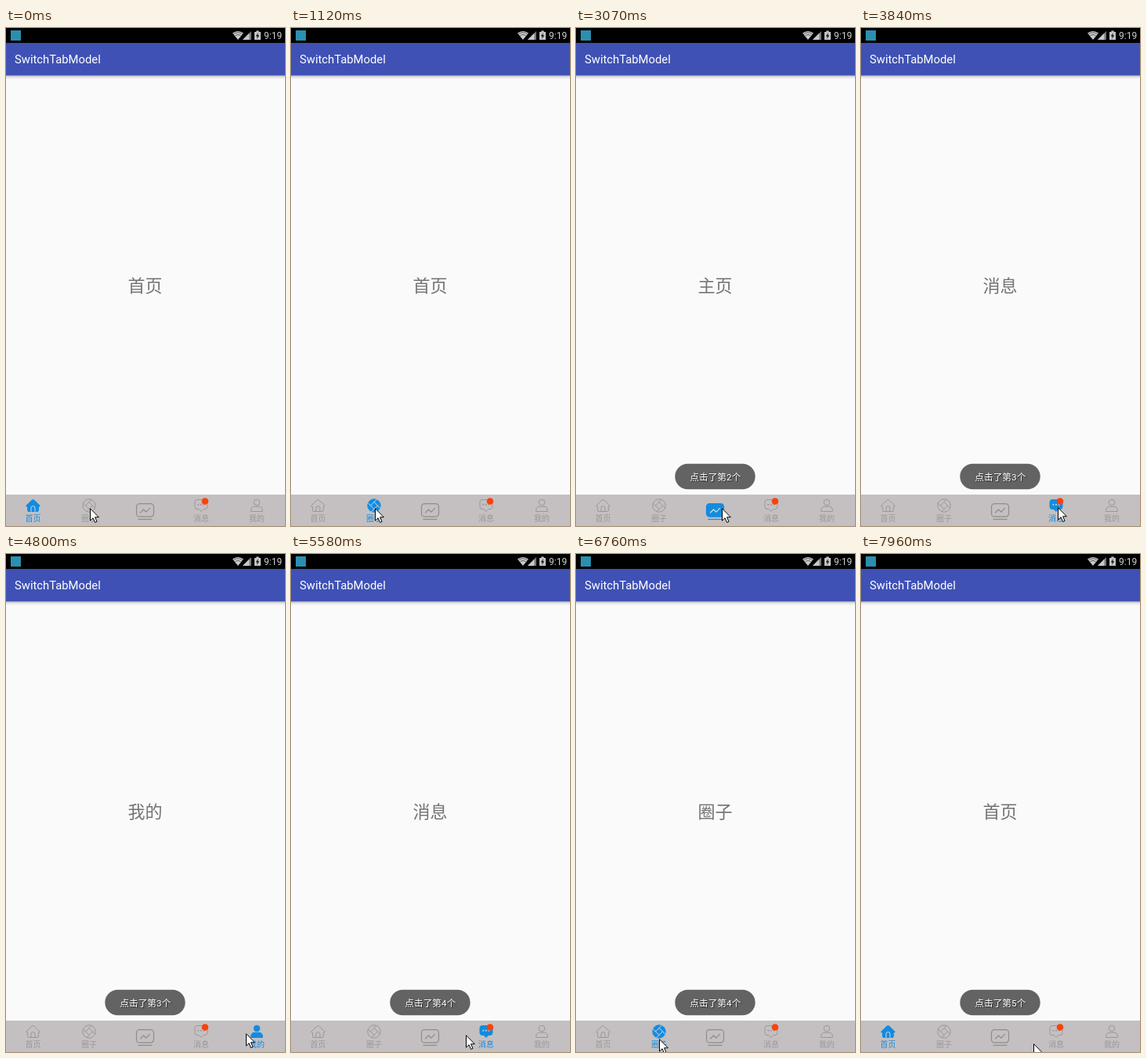
These frames come from a looping animation (356x634 px, 8 s). An HTML page:

```html
<!DOCTYPE html>
<html lang="zh-CN">
<head>
<meta charset="utf-8">
<title>Tab bar</title>
<style>
  html, body { margin: 0; width: 100%; height: 100%; overflow: hidden; background: #fafafa; }
  svg { display: block; width: 356px; height: 634px; }
  text { font-family: Roboto, "Noto Sans CJK SC", "Noto Sans CJK JP", sans-serif; }
  .page { font-size: 22px; fill: #737373; text-anchor: middle; }
  .tab { --line: #9b9799; --fill: none; --detail: #9b9799; }
  .tab.mid { --line: #8f8c8e; --detail: #8f8c8e; }
  .tab.on { --line: #148be0; --fill: #148be0; --detail: #d3dbe2; }
  .tab text { font-size: 10px; fill: var(--line); text-anchor: middle; }
  .shape { fill: var(--fill); stroke: var(--line); stroke-linejoin: round; }
  .detail { fill: none; stroke: var(--detail); stroke-linecap: round; stroke-linejoin: round; }
  .dot { fill: var(--detail); }
  .toast text { font-size: 11.7px; fill: #fff; text-shadow: 1px 1px 1px #0009; }
</style>
</head>
<body>
<svg viewBox="0 0 356 634">
  <defs>
    <linearGradient id="shade" x2="0" y2="1">
      <stop stop-color="#000" stop-opacity=".26"/>
      <stop offset=".4" stop-color="#000" stop-opacity=".1"/>
      <stop offset="1" stop-color="#000" stop-opacity="0"/>
    </linearGradient>
  </defs>
  <rect width="356" height="634" fill="#fafafa"/>

  <!-- status bar -->
  <rect width="356" height="19" fill="#000"/>
  <rect x="6" y="3" width="13" height="13" fill="#2b8fb0"/>
  <path d="M289 6.6Q296 1.4 303 6.6L296 15Z" fill="#c9c9c9"/>
  <path d="M290.5 7.6Q296 3.8 301.5 7.6M292.4 9.6Q296 7 299.6 9.6" fill="none" stroke="#000" stroke-width=".5"/>
  <path d="M302 15L313 4V15Z" fill="#777"/>
  <path d="M302 15L310.5 6.5V15Z" fill="#c9c9c9"/>
  <path d="M317 5H319.3V3.5H322.7V5H325V15H317Z" fill="#c4c4c4"/>
  <path d="M322 6L318.7 10.6H320.8L320 14L323.3 9.3H321.2Z" fill="#111"/>
  <text x="329" y="14" font-size="12" fill="#d0d0d0">9:19</text>

  <!-- app bar -->
  <rect y="60.5" width="356" height="5" fill="url(#shade)"/>
  <rect y="19" width="356" height="41.5" fill="#3f51b5"/>
  <text x="11" y="45.2" font-size="14.8" fill="#fff">SwitchTabModel</text>

  <text class="page" id="page" x="177.5" y="336"></text>

  <!-- bottom bar -->
  <rect y="594" width="356" height="40" fill="#c4c0c1"/>
  <g class="tab" transform="translate(34.5 608)">
    <path class="shape" d="M-8.8 .2L-1.4-6.9Q0-8 1.4-6.9L8.8 .2Q9 1.2 6.9 1.2V6Q6.9 7.5 5.4 7.5H-5.4Q-6.9 7.5-6.9 6V1.2Q-9 1.2-8.8 .2Z"/>
    <path class="detail" d="M-2.5 7.3V3Q-2.5 .6 0 .6T2.5 3V7.3"/>
    <text y="20">首页</text>
  </g>
  <g class="tab" transform="translate(106 608)">
    <circle class="shape" r="8.2"/>
    <path class="detail" id="wheel"/>
    <text y="20">圈子</text>
  </g>
  <g class="tab mid" transform="translate(177.5 615)" stroke-width="1.2">
    <rect class="shape" x="-11" y="-9.4" width="22" height="16.6" rx="4"/>
    <path class="detail" d="M-6 2L-2-2L1.5 1.2L6-3.6"/>
    <path class="shape" d="M-9 10.5H9"/>
  </g>
  <g class="tab" transform="translate(249 608)">
    <path class="shape" d="M-5-7.5H5Q8-7.5 8-4.5V1.5Q8 4.5 5 4.5H3L0 7.5L-3 4.5H-5Q-8 4.5-8 1.5V-4.5Q-8-7.5-5-7.5Z"/>
    <circle class="dot" cx="-3.6" cy="-1.3" r="1"/>
    <circle class="dot" cy="-1.3" r="1"/>
    <circle class="dot" cx="3.6" cy="-1.3" r="1"/>
    <circle cx="5" cy="-5.5" r="4.3" fill="#f9420c"/>
    <text y="20">消息</text>
  </g>
  <g class="tab" transform="translate(320 608)">
    <circle class="shape" cy="-4" r="3.8"/>
    <path class="shape" d="M-7.3 7.5V6Q-7.3 1.3-2.6 1.3H2.6Q7.3 1.3 7.3 6V7.5Z"/>
    <text y="20">我的</text>
  </g>

  <g class="toast" id="toast">
    <rect x="126.3" y="554.7" width="102.4" height="32.6" rx="16.3" fill="#636363"/>
    <text x="145.3" y="576">点击了第<tspan id="count"></tspan>个</text>
  </g>

  <path id="cursor" d="M.5 .8V16.2L4.1 12.8L6.6 18.5L9 17.5L6.6 11.8H11.4Z" fill="#fff" stroke="#000"/>
</svg>
<script>
  const LOOP = 8000;
  const STEP = 132, PHASE = 34;  // the screen refreshes in coarse steps
  const FADE = 400, TOAST_DELAY = 140, TOAST_TIME = 1905;
  const pages = ['首页', '圈子', '主页', '消息', '我的'];

  // The pointer glides from stop to stop and clicks a tab at each one.
  const stops = [
    { tab: 1, x: 107, y: 611, arrive: 0, click: 1120, leave: 1600 },
    { tab: 2, x: 186, y: 611, arrive: 2040, click: 3070, leave: 3070 },
    { tab: 3, x: 250, y: 610, arrive: 3570, click: 3720, leave: 3720 },
    { tab: 4, x: 328, y: 610, arrive: 4280, click: 4680, leave: 4640 },
    { tab: 3, x: 250, y: 611, arrive: 5160, click: 5220, leave: 5350 },
    { tab: 2, x: 185, y: 614, arrive: 5900, click: 6070, leave: 6060 },
    { tab: 1, x: 106, y: 617, arrive: 6360, click: 6640, leave: 6760 },
    { tab: 0, x: 30, y: 612, arrive: 7270, click: 7420, leave: 7672 },
    { x: 220, y: 623, arrive: 7954 }
  ];

  const $ = id => document.getElementById(id);
  const tabs = [...document.querySelectorAll('.tab')];
  const clamp = v => Math.max(0, Math.min(1, v));
  const mix = (a, b, k) => Math.round(a + (b - a) * k);

  function pointer(t) {
    const i = Math.max(1, stops.findLastIndex(s => s.arrive <= t) + 1);
    const to = stops[i], from = stops[i - 1];
    if (!to) return from;
    const k = clamp((t - from.leave) / (to.arrive - from.leave));
    return { x: mix(from.x, to.x, k), y: mix(from.y, to.y, k) };
  }

  // Pinwheel: one chord turned by quarter circles.
  let [a, b, c, d] = [-4.5, 0, 3.1, -7.6], wheel = '';
  for (let i = 0; i < 4; i++) {
    wheel += `M${a} ${b}L${c} ${d}`;
    [a, b, c, d] = [-b, a, -d, c];
  }
  $('wheel').setAttribute('d', wheel);

  function draw(t) {
    const shown = PHASE + Math.floor((t - PHASE) / STEP) * STEP;
    const active = stops.findLast(s => s.click <= t)?.tab ?? 0;
    const first = stops[0].click;
    const fade = clamp((shown - first) / FADE);
    const queued = Math.floor((t - first - TOAST_DELAY) / TOAST_TIME);
    const { x, y } = pointer(shown);

    tabs.forEach((tab, i) => tab.classList.toggle('on', i === active));
    $('page').textContent = pages[fade ? active : 0];
    $('count').textContent = 2 + Math.max(0, queued);
    $('toast').setAttribute('opacity', fade);
    $('cursor').setAttribute('transform', `translate(${x} ${y})`);
  }

  const start = performance.now();
  function tick() {
    draw((performance.now() - start) % LOOP);
    requestAnimationFrame(tick);
  }
  tick();
</script>
</body>
</html>
```
